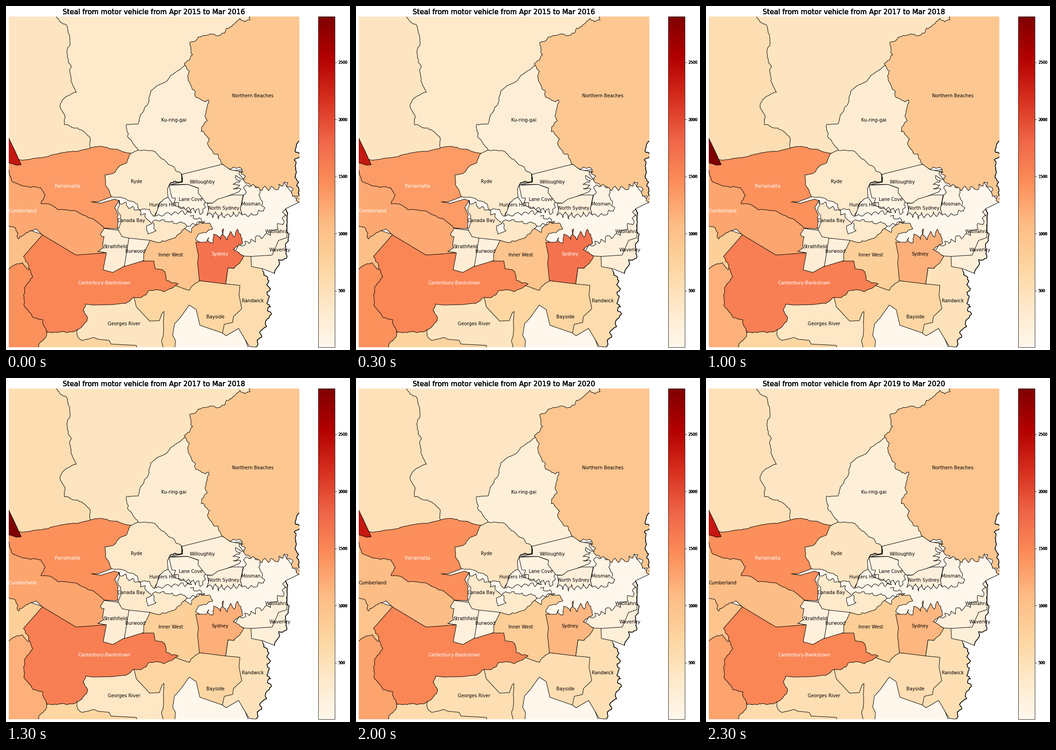
These frames come from a looping animation (747 px wide and 750 px high, 2500 ms). A matplotlib script:

```python
import numpy as np
import matplotlib.pyplot as plt
from matplotlib.animation import FuncAnimation
from matplotlib.cm import ScalarMappable
from matplotlib.colors import Normalize

W, H = 747, 750
LEFT, RIGHT, TOP, BOTTOM = 6, 636.6, 22.7, 744
LOW, HIGH = 4, 2902
WHITE_TEXT_ABOVE = 1200

plt.rcParams["font.family"] = "DejaVu Sans"
fig = plt.figure(figsize=(W / 72, H / 72), dpi=72, facecolor="white")


def pixel_axes(x0, x1):
    return fig.add_axes([x0 / W, 1 - BOTTOM / H, (x1 - x0) / W, (BOTTOM - TOP) / H])


ax = pixel_axes(LEFT, RIGHT)
ax.set_xlim(LEFT, RIGHT)
ax.set_ylim(BOTTOM, TOP)
ax.axis("off")

scale = ScalarMappable(Normalize(LOW, HIGH), "OrRd")
regions = []


def seeded(pts):
    return np.random.default_rng(int(np.abs(pts).sum()))


def creek(*keys, amp=0.09):
    """Natural border: midpoint displacement between key points."""
    pts = np.array(keys, float)
    rng = seeded(pts)
    for _ in range(4):
        out = [pts[0]]
        for a, b in zip(pts, pts[1:]):
            dx, dy = b - a
            if np.hypot(dx, dy) > 5:
                out.append((a + b) / 2 + rng.normal(0, amp) * np.array([-dy, dx]))
            out.append(b)
        pts = np.array(out)
    return pts


def shore(*keys, depth=7, pitch=8):
    """Harbour edge: coves and points alternate along the key points."""
    pts = np.array(keys, float)
    rng = seeded(pts)
    out = [pts[0]]
    side = 1
    for a, b in zip(pts, pts[1:]):
        d = b - a
        length = np.hypot(*d)
        normal = np.array([-d[1], d[0]]) / length
        steps = max(2, round(2 * length / pitch))
        for t in np.arange(1, steps) / steps:
            out.append(a + t * d + side * depth * rng.uniform(0.3, 1) * normal)
            side = -side
        out.append(b)
    return creek(*out, amp=0.13)


def region(values, *parts, label=None, at=(0, 0)):
    """Join borders and single corner points into one filled area."""
    outline = np.vstack([np.atleast_2d(p) for p in parts])
    patch = plt.Polygon(outline, ec="black", lw=1, joinstyle="round")
    ax.add_patch(patch)
    text = label and ax.text(at[0] - 0.5, at[1] + 2.8, label, size=10,
                             ha="center", zorder=5)
    regions.append((patch, text, np.broadcast_to(values, 5)))


def line(pts, width):
    ax.plot(*pts.T, color="black", lw=width, zorder=3)


# Regions go from back to front; hidden edges run under their neighbours.
# North
region([340, 350, 430, 380, 410],
       (90, 10), (560, 10), (560, 60), (430, 180), (300, 340), (100, 340))
region([430, 430, 550, 420, 500],
       (-5, 10),
       creek((107, 10), (110, 24), (131, 41), (138, 66), (133, 112), (141, 130),
             (144, 170), (153, 188), (131, 197), (118, 214), (128, 238),
             (127, 259), (156, 266), (183, 288), (185, 320)),
       (185, 340), (-5, 350))
region(LOW,
       (185, 427), (228, 410), (330, 410), (380, 366), (515, 357), (560, 385),
       (600, 380), (636, 428), (607, 442), (600, 530), (500, 548), (400, 530),
       (300, 510), (235, 480))
region([220, 250, 260, 200, 200],
       creek((388, 130), (352, 160), (314, 186), (308, 214), (291, 242),
             (287, 257), (262, 258), (264, 285), (287, 314), amp=0.07),
       (300, 340), (380, 372), (480, 360), (500, 340), (460, 210), (400, 120),
       label="Ku-ring-gai", at=(365, 249))

ocean_north = creek((640, 426), (636, 400), (628, 370), (626, 336), (638, 328),
                    (633, 298), (642, 285), amp=0.14)
region([910, 820, 910, 780, 930],
       creek((535, 10), (530, 30), (508, 27), (490, 45), (455, 64), (399, 80),
             (387, 126), (398, 142), (400, 170), (412, 199), (440, 205),
             (437, 250), (424, 274), (442, 290), (444, 311), (467, 342),
             (487, 356), (513, 357), amp=0.13),
       shore((513, 357), (520, 386), (549, 398), (583, 399), (612, 385),
             (620, 408), (636, 428), depth=6, pitch=14),
       ocean_north, (650, 10),
       label="Northern Beaches", at=(536, 196))
line(ocean_north, 1.5)

# West
region([1420, 1330, 1180, 1060, 1280],
       (-5, 550), (60, 550), (95, 720), (60, 760), (-5, 760))
region([720, 620, 700, 580, 600],
       creek((88, 700), (80, 730), (67, 750)),
       (300, 755), (300, 720), (180, 700), (150, 690))
region([1040, 1000, 800, 900, 970],
       (-5, 470), (85, 500), (60, 560),
       creek((48, 575), (36, 560), (24, 562), (6, 574)), (-5, 576))
region([1240, 1010, 1270, 1160, 1060],
       (-5, 350), (60, 370), (220, 470), (225, 530), (199, 545), (120, 550),
       (79, 499), (65, 486), creek((65, 486), (27, 508), (20, 484), (-5, 478)),
       label="Cumberland", at=(36.5, 447))
region([1340, 1150, 1430, 1300, 1440],
       creek((-5, 326), (46, 335), (108, 323), (185, 309), (205, 306),
             (232, 312), (272, 321), amp=0.05),
       (285, 350), (250, 400), (229, 416), (200, 427), (185, 427), (205, 430),
       creek((236, 421), (245, 424), (236, 440), (243, 474), (241, 486)),
       (213, 484),
       creek((213, 484), (165, 455), (152, 447), (112, 444), (95, 432),
             (76, 431), (85, 412), (75, 396), (35, 392), (12, 380), (6, 357),
             amp=0.06),
       (-5, 356), label="Parramatta", at=(134, 393))
region([2350, 2560, 2900, 2640, 2350],
       (-5, 270), (6, 288), (19, 315), (33, 346),
       creek((33, 346), (14, 344), (-5, 342)))

# South
region([700, 560, 690, 620, 560],
       (270, 630), (300, 610), (375, 600), (420, 590), (520, 595), (530, 670),
       (500, 690), (471, 713), (400, 755), (330, 760), (300, 700),
       label="Bayside", at=(455, 678))
region([430, 370, 400, 390, 540],
       (180, 640), (277, 630), (283, 656), (312, 687), (333, 686),
       creek((338, 672), (343, 666), (342, 712), (338, 728), (341, 755),
             amp=0.04),
       (286, 755), (283, 740), (228, 737), (224, 729),
       creek((205, 727), (165, 729), (156, 722), (160, 695)), (165, 650),
       label="Georges River", at=(257, 693))
region(LOW,
       (398, 652), (378, 680), (366, 693), (362, 718), (368, 729), (366, 755),
       (530, 755), (505, 690), (470, 713), (421, 696), (413, 662))
region([960, 870, 800, 820, 820],
       (300, 505), (350, 505), (388, 485),
       creek((402, 494), (405, 483), (442, 473), (449, 486), (418, 497),
             (412, 510)),
       (430, 520), (430, 600),
       creek((420, 599), (398, 620), (375, 612)),
       (340, 600), (310, 565), (295, 560), (295, 520),
       label="Inner West", at=(358, 543))

ocean_south = shore((558, 578), (571, 600), (569, 640), (571, 680), (557, 705),
                    (542, 744), depth=6, pitch=17)
region([590, 550, 480, 550, 540],
       (482, 571), (495, 572), (516, 540), (545, 545), ocean_south,
       (528, 742), (505, 703), (478, 719), (470, 713), (474, 694), (492, 690),
       (494, 677), (512, 660), (506, 630), (508, 609), (477, 606),
       label="Randwick", at=(536, 643))
line(ocean_south, 1.5)

ocean_mid = creek((607, 443), (612, 452), (610, 483), (613, 512), (609, 550),
                  (592, 553), (583, 583))
region([230, 220, 200, 200, 200],
       (532, 546), (560, 540), (585, 500), ocean_mid[len(ocean_mid) // 3:],
       (558, 573), (533, 568), label="Waverley", at=(595, 532))
region(170,
       (497, 536),
       shore((506, 520), (560, 502), (583, 488), (604, 470), (607, 443), pitch=14),
       (611, 452), (610, 505), (592, 511), (578, 543), (532, 546), (516, 545),
       label="Woollahra", at=(588, 492))
line(ocean_mid, 1.5)

region([1680, 1540, 1190, 1290, 1130],
       (412, 515), (435, 515),
       shore((440, 505), (458, 500), (510, 498), depth=14, pitch=14),
       creek((510, 498), (514, 516), (493, 531), (516, 545), (495, 572)),
       (482, 571), (477, 606), (420, 599), (416, 560), (418, 545),
       label="Sydney", at=(465, 541))
region([1520, 1730, 1580, 1410, 1520],
       (79, 499), (152, 543), (180, 541), (218, 538), (230, 560), (300, 556),
       (321, 556), (324, 573),
       creek((340, 575), (348, 598), (374, 606), (344, 623), (308, 622),
             (279, 635), (256, 648)),
       (232, 651), (190, 652), (173, 650),
       creek((173, 650), (176, 686), (157, 705), (112, 712), (90, 712),
             (80, 684), (60, 680), (40, 646), (38, 630), (44, 609), (58, 590),
             (50, 566), (38, 546)),
       label="Canterbury-Bankstown", at=(214, 604))

# Inner suburbs
region([250, 260, 250, 230, 170],
       (213, 485), (250, 490), (275, 506), (257, 567), (232, 581), (211, 575),
       (218, 538), creek((199, 535), (212, 527), (213, 503), (205, 498)),
       label="Strathfield", at=(238, 525))
region([150, 150, 170, 110, 110],
       (268, 500), (313, 511), (299, 540), (299, 555), (257, 568), (267, 506),
       label="Burwood", at=(281, 535))
region([380, 380, 340, 340, 340],
       shore((246, 424), (262, 436), (285, 444), (303, 462), pitch=12),
       creek((317, 474), (305, 480), (308, 497), (326, 490), (318, 470)),
       shore((325, 466), (388, 474), depth=4, pitch=18),
       creek((393, 480), (366, 506), (330, 516)),
       (313, 511), (267, 506), (252, 503),
       creek((243, 487), (249, 456), (242, 446), (246, 424)),
       label="Canada Bay", at=(272, 468))
region([330, 420, 340, 370, 440],
       creek((272, 321), (287, 314), (316, 315), (342, 334), (382, 367)),
       (381, 384), (358, 385),
       creek((354, 392), (352, 417), (334, 430), (322, 459), (311, 443),
             (290, 445), (278, 427), (229, 416), (216, 390), (215, 368),
             (238, 361), (262, 342), (272, 321), amp=0.07),
       label="Ryde", at=(284, 383))
region(50,
       (343, 421), (352, 417), (363, 433),
       shore((374, 438), (403, 450), depth=4, pitch=16),
       shore((403, 450), (345, 453), (324, 458), depth=5, pitch=14),
       (334, 430), label="Hunters Hill", at=(341, 434))
region(115,
       (354, 391), (395, 389), (425, 400), (440, 428),
       shore((434, 428), (428, 450), (380, 440), (360, 418), depth=6, pitch=11),
       label="Lane Cove", at=(402, 422))
region(185,
       (382, 367), (470, 345), (487, 357),
       shore((515, 362), (500, 378), (506, 405), depth=11, pitch=10),
       (480, 415), (448, 430), (434, 429), (417, 407), (418, 397), (395, 389),
       (357, 389), (383, 384), label="Willoughby", at=(427, 384))
region(190,
       (437, 430), (448, 430), (460, 421), (490, 412), (515, 412), (509, 442),
       shore((513, 455), (436, 457), depth=9, pitch=13), (440, 445),
       label="North Sydney", at=(473, 441))
region(95,
       shore((516, 412), (522, 390), (549, 396), (552, 420), (562, 440),
             (540, 456), (513, 456), depth=5, pitch=14),
       (509, 442), label="Mosman", at=(532, 432))
line(creek((381, 367), (383, 383), (358, 385), (354, 392)), 1.4)
line(shore((393, 480), (432, 470), (400, 458), depth=5, pitch=14), 1)

# Colour bar
bar = pixel_axes(678.3, 714.3)
fig.colorbar(scale, cax=bar, ticks=range(500, 2501, 500))
bar.tick_params(labelright=False, length=3.5, width=0.8)


def heavy_text(x, y, text, size, **style):
    """Stack copies so the antialiased edges darken."""
    return [fig.text(x / W, 1 - y / H, text, size=size, **style) for _ in range(5)]


for v in range(500, 2501, 500):
    y = BOTTOM - (v - LOW) / (HIGH - LOW) * (BOTTOM - TOP)
    heavy_text(721.2, y, v, 8, va="center_baseline")

titles = heavy_text((LEFT + RIGHT) / 2, 17.8, "", 15, ha="center")


def update(i):
    for patch, text, values in regions:
        patch.set_facecolor(scale.to_rgba(values[i]))
        if text:
            text.set_color("white" if values[i] > WHITE_TEXT_ABOVE else "black")
    for title in titles:
        title.set_text(f"Steal from motor vehicle from Apr {2015 + i} to Mar {2016 + i}")


anim = FuncAnimation(fig, update, frames=5, interval=500, repeat=True,
                     repeat_delay=0, init_func=lambda: update(0))
plt.show()
```
